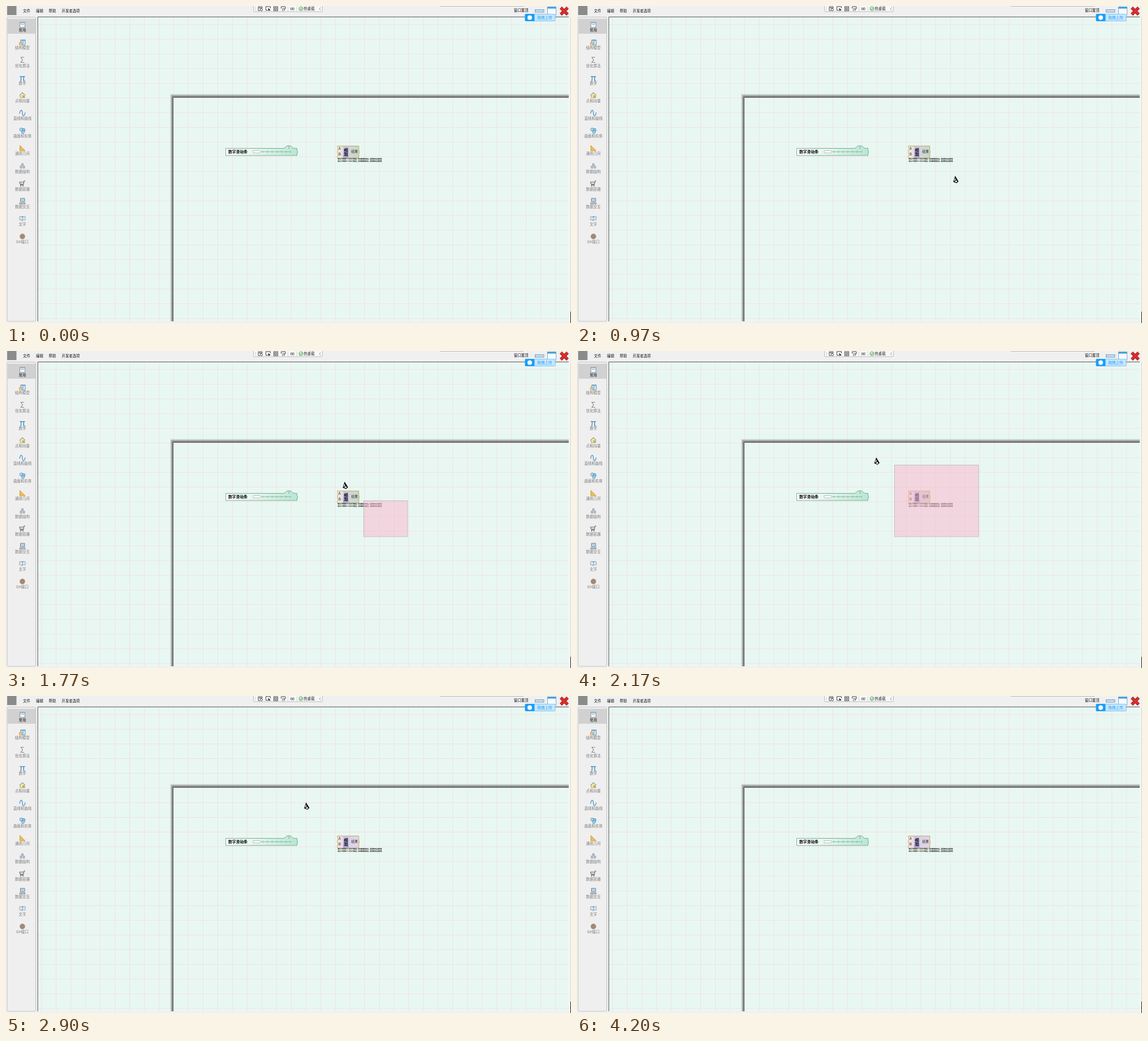
An HTML page for the animation above (4230 ms loop, 999 px wide and 560 px high).

```html
<!DOCTYPE html>
<html>
<head>
<meta charset="utf-8">
<style>
html, body { margin: 0; width: 100%; height: 100%; overflow: hidden; background: #f0f0f0; }
svg { display: block; }
text { font-family: "Noto Sans CJK SC", "Noto Sans CJK", sans-serif; white-space: pre; }
</style>
</head>
<body>
<svg width="999" height="560" viewBox="0 0 999 560">
  <defs>
    <pattern id="grid" x="296" y="162" width="25.97" height="25.97" patternUnits="userSpaceOnUse">
      <path d="M.5 0V26M0 .5H26" stroke="#eee0e2" stroke-width=".9"/>
    </pattern>
    <linearGradient id="shadeX"><stop offset="0" stop-color="#555" stop-opacity="0"/><stop offset="1" stop-color="#555"/></linearGradient>
    <linearGradient id="shadeY" x2="0" y2="1"><stop offset="0" stop-color="#555" stop-opacity="0"/><stop offset="1" stop-color="#555"/></linearGradient>
    <linearGradient id="sliderFill"><stop offset="0" stop-color="#fff"/><stop offset=".35" stop-color="#eaf7f1"/><stop offset="1" stop-color="#b9e6d2"/></linearGradient>
    <linearGradient id="idleFill"><stop offset="0" stop-color="#f3eae2"/><stop offset=".5" stop-color="#d5d5d8"/><stop offset="1" stop-color="#c3d9c6"/></linearGradient>
    <linearGradient id="pickedFill"><stop offset="0" stop-color="#f6e5e4"/><stop offset=".5" stop-color="#dcd0e8"/><stop offset="1" stop-color="#e2d6e6"/></linearGradient>
    <linearGradient id="bandFill" x2="0" y2="1"><stop offset="0" stop-color="#d0c9e4"/><stop offset="1" stop-color="#a9a3dc"/></linearGradient>
  </defs>

  <rect width="999" height="560" fill="#f0f0f0"/>

  <g id="canvas">
    <rect x="56" y="19" width="939" height="538" fill="#e9f7f2"/>
    <rect x="56" y="19" width="939" height="538" fill="url(#grid)"/>
    <path d="M290 155L296 162V557H290Z" fill="url(#shadeX)"/>
    <path d="M290 155H995V162H296Z" fill="url(#shadeY)"/>
    <path d="M56.2 557V19.3H995" fill="none" stroke="#555"/>
    <path d="M995.5 19V557" stroke="#fafafa"/>
    <path d="M998.5 20V540" stroke="#dcdcdc"/>
    <path d="M998.5 540V560" stroke="#222"/>
  </g>

  <g id="slider">
    <path d="M388.5 251.5H490Q494 251 496 247.5Q500 245.800 504 247.500Q506 251 510 251.500H514.500V255Q517 258 514.500 261V264H388.500Z" fill="url(#sliderFill)" stroke="#69a78d" stroke-width=".9"/>
    <text x="393" y="259.600" font-size="6.800" font-weight="700">数字滑动条</text>
    <path id="track" fill="none" stroke="#7ba894" stroke-width=".7"/>
    <path d="M437 255.500H448L451.500 257.500L448 259.500H437Z" fill="#fff" stroke="#999" stroke-width=".6"/>
    <text x="499" y="251.500" font-size="4.500" fill="#467">1</text>
  </g>

  <g id="node">
    <path id="nodeBody" d="M586 247.300H623.800V255Q626 258 623.800 261V268.700H586V265Q588.500 262 586 259.500V254.500Q588.500 252 586 249.500Z" stroke="#c0a44c" stroke-width=".9"/>
    <rect x="596" y="247.800" width="10" height="20.500" fill="url(#bandFill)"/>
    <g font-size="6" fill="#222">
      <text x="588" y="254">A</text><text x="588" y="264.300">B</text>
      <text x="610.500" y="259.400" font-size="5.800">结果</text>
    </g>
    <g font-size="7.200" font-weight="700" text-anchor="middle">
      <text x="601" y="256.500">相</text><text x="601" y="263.800">加</text>
    </g>
    <g font-size="2.700" font-weight="700">
      <text x="586.500" y="271.300">加法: 处理两个人可以分割后,  比较数据增加后,  返回增加后结果集</text>
      <text x="586.500" y="275">加法: 处理两个人可以分割后,  比较数据增加后,  返回增加后结果集</text>
    </g>
  </g>

  <g id="menu" font-size="6.400" fill="#111">
    <rect x="2" y="0" width="16.500" height="16" fill="#8b8b8b"/>
    <text x="30" y="10.500">文件</text><text x="53" y="10.500">编辑</text>
    <text x="75.500" y="10.500">帮助</text><text x="98.500" y="10.500">开发者选项</text>
    <text x="898" y="10.300">窗口置顶</text>
    <path d="M767 0H915" stroke="#bbb" stroke-width="2"/>
  </g>

  <g id="debugBar" fill="none" stroke="#333" stroke-width=".9">
    <rect x="437.500" y="-2" width="122" height="12" rx="1.500" fill="#f7f7f7" stroke="#b5b5b5"/>
    <path d="M441 2V8" stroke="#999" stroke-dasharray="1 1"/>
    <path d="M446 1.500H453V4M446 1.500V8H449M447 3.500H452"/><circle cx="451.500" cy="6.500" r="2"/>
    <path d="M463 7.500H459.500V1H467.500V4"/><path d="M463.500 3.500L468 7.500L465.500 7.700L464 9Z" fill="#222" stroke="none"/>
    <rect x="473.500" y="1.300" width="7" height="7"/><rect x="475.500" y="3.300" width="3" height="3"/>
    <path d="M486.500 4.500V1.300H494V5H488M488 6.500L490 9M492 5V8.500"/>
    <path d="M498.500 1V9M514.500 1V9" stroke="#d0d0d0"/>
    <path d="M504 2.500Q502.500 5 504 7.500M508.500 2.500Q510 5 508.500 7.500M507.500 3.500H505.500V5H507V6.500H505" stroke-width=".8"/>
    <circle cx="521.500" cy="4.800" r="3.400" fill="#e5f5e7" stroke="#3b9849"/>
    <path d="M519.800 4.800L521.200 6.300L523.500 3.300" stroke="#278238"/>
    <text x="526.300" y="7.200" font-size="6.500" fill="#222" stroke="none">热重载</text>
    <path d="M556.500 2.500L554 5L556.500 7.500" stroke="#888"/>
  </g>

  <g id="windowButtons">
    <rect x="935.500" y="6.500" width="15.500" height="4.500" fill="#c2ddf2" stroke="#668db0" stroke-width=".8"/>
    <rect x="957.500" y="2" width="15" height="14" fill="#f7fbff" stroke="#6a9ac0" stroke-width=".8"/>
    <rect x="957.200" y="1.500" width="15.600" height="3" fill="#3d9bd8"/>
    <path d="M981 3L993 15M993 3L981 15" stroke="#7d1414" stroke-width="5.400"/>
    <path d="M981 3L993 15M993 3L981 15" stroke="#dc2d2d" stroke-width="4"/>
    <rect x="918" y="14.300" width="53" height="12.200" rx="1.500" fill="#c5e7ff" stroke="#58b5f5" stroke-width=".7"/>
    <rect x="917.700" y="14" width="16.800" height="12.800" rx="1.500" fill="#199dfb"/>
    <circle cx="926" cy="20.400" r="4" fill="#fff"/>
    <text x="939.500" y="23" font-size="6.600" fill="#2b9df0">拖拽上传</text>
  </g>

  <g id="sidebar">
    <rect x="2" y="19.500" width="50.500" height="537.500" rx="2" fill="#efefef" stroke="#b9b9b9" stroke-width=".8"/>
    <rect x="3" y="22.500" width="49" height="26.500" fill="#d1d1d1"/>
  </g>

  <rect id="marquee" fill="#fcb6cd" fill-opacity=".5" stroke="#b4b9b6" stroke-width=".8"/>
  <g id="cursor">
    <path d="M0 0L6 9.800L2.500 12.800L-3.400 10.600Z" fill="#0a0a0a"/>
    <path d="M-.3 3.600L1 6.800L-2 9.600ZM-.8 10.200L2 7.800L3.800 10L2.300 11.500Z" fill="#fff"/>
  </g>
</svg>
<script>
const LOOP = 4230, STEP = 1000 / 30;
const byId = id => document.getElementById(id);

byId("track").setAttribute("d", "M451 257.500H504" +
  Array.from({ length: 7 }, (_, i) => `M${454 + i * 8.250} 255.500v4`).join(""));

// Icons are drawn around their own centre.
const glyph = (char, color, size = 13) =>
  `<text y="${size * .36}" font-size="${size}" fill="${color}" text-anchor="middle">${char}</text>`;
const line = (d, color, fill = "none", width = 1) =>
  `<path d="${d}" stroke="${color}" fill="${fill}" stroke-width="${width}"/>`;
const dot = (x, y, r, fill, stroke = "none") =>
  `<circle cx="${x}" cy="${y}" r="${r}" fill="${fill}" stroke="${stroke}" stroke-width=".8"/>`;

const items = [
  ["常用", line("M-4.500-4.500H4.500V4.500H-4.500Z", "#8794a0", "#f8f8f8") + line("M-4.500-3.500H4.500M-3-1H3", "#6aa3d0")],
  ["结构模型", line("M-3-4.500H5V4.500H-3Z", "#5c92b5", "#dceefa") + line("M-3-3.500H5M1-3V4", "#3f92cc") + line("M-5 5V0H-1V5", "#d18a38", "#f4cd85")],
  ["优化算法", glyph("Σ", "#888")],
  ["数学", glyph("π", "#3589bd", 16)],
  ["点和向量", line("M-4 4V-1L0-5L4-1V4Z", "#d0a33b", "#fae69b") + line("M-5 0L0-5L5 0M1 4V0L4 4", "#5489a8")],
  ["直线和曲线", line("M-5 1C-3-9 0-4 0 0S3 9 5-1", "#438fc2", "none", 1.200)],
  ["曲面和实体", dot(-2, -2, 2.800, "#b9dcf0", "#4387b0") + dot(2, -1, 2.800, "#8dc2e2", "#4387b0") + dot(1, 2.500, 2.500, "#a8d5ee", "#4387b0")],
  ["通用几何", line("M-4.500-5V4.500H5Z", "#d29a33", "#f4c35d") + line("M-2.500-.5V2.500H1Z", "#d29a33", "#f0f0f0", .700)],
  ["数据结构", line("M-4 4V0H-1V4ZM1 4V0H4V4ZM-1.500-1V-4H1.500V-1Z", "#8b98a5", "#b6c6d4", .800)],
  ["数据容器", line("M5-4.500H3L2 1H-4L-5-2.500H2.500M2 1L1 2.500H-4", "#777", "none", 1.200) + dot(-3, 4, 1, "#666") + dot(1, 4, 1, "#666")],
  ["数据交互", line("M-3.500-5H4V1H-3.500Z", "#708596", "#b4d4e8") + line("M-5 3H5V5H-5Z", "#808890", "#d5d9dc")],
  ["文字", line("M-5-4H5V2H1L-1 4V2H-5Z", "#7b98aa", "#dceaf3", .800) + glyph("T", "#2b75a5", 7)],
  ["GH接口", dot(0, 0, 4.800, "#a48975")]
];
byId("sidebar").innerHTML += items.map(([label, icon], i) => {
  const y = 33.300 + i * 31.150;
  const style = i ? 'fill="#777"' : 'fill="#111" font-weight="500"';
  return `<g transform="translate(29 ${y})">${icon}</g>
    <text x="29" y="${y + 12}" font-size="6.450" text-anchor="middle" ${style}>${label}</text>`;
}).join("");

// Keys are [time, x, y].
const cursorPath = [
  [270, 885, 275], [400, 790, 291], [570, 697, 307], [770, 673, 309], [870, 669, 296],
  [966, 668.500, 300], [1160, 714, 324], [1300, 712, 329], [1366, 710, 328],
  [1766, 599, 231], [1830, 577, 215], [2000, 544, 198], [2166, 529, 188],
  [2870, 529, 188], [2900, 530.500, 188], [3170, 676, 286], [3270, 689, 321],
  [3400, 640, 320], [3620, 527, 307], [3680, 527, 307], [3930, 647, 295], [4170, 956, 256]
];
const marqueePath = [
  [1400, 710, 328], [1766, 632.500, 264.500], [1930, 600, 235],
  [2166, 561.500, 201.500], [2400, 528.500, 187.500]
];

function along(keys, t) {
  const next = keys.findIndex(key => key[0] > t);
  if (next < 0) return keys[keys.length - 1].slice(1);
  if (next === 0) return keys[0].slice(1);
  const [t0, x0, y0] = keys[next - 1], [t1, x1, y1] = keys[next];
  const k = (t - t0) / (t1 - t0);
  return [x0 + (x1 - x0) * k, y0 + (y1 - y0) * k];
}

const cursor = byId("cursor"), marquee = byId("marquee"), nodeBody = byId("nodeBody");
const show = (el, on) => el.setAttribute("visibility", on ? "visible" : "hidden");

function render(time) {
  const t = Math.floor((time % LOOP + 1) / STEP) * STEP;
  const [x, y] = along(cursorPath, t);
  cursor.setAttribute("transform", `translate(${x} ${y})`);
  show(cursor, t > 265 && t < 4195);

  const [left, top] = along(marqueePath, t);
  marquee.setAttribute("x", left);
  marquee.setAttribute("y", top);
  marquee.setAttribute("width", 710 - left);
  marquee.setAttribute("height", 328 - top);
  show(marquee, t > 1400 && t < 2495);

  nodeBody.setAttribute("fill", t > 2495 ? "url(#pickedFill)" : "url(#idleFill)");
}

const start = performance.now();
function tick() {
  render(performance.now() - start);
  requestAnimationFrame(tick);
}
tick();
</script>
</body>
</html>
```
